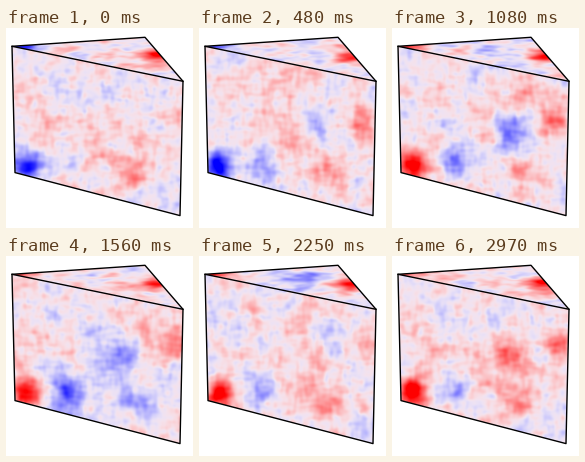
Animation, 187 px wide and 200 px high, one loop 3 s. Source, as a matplotlib script:

```python
import numpy as np
import matplotlib.pyplot as plt
from matplotlib.animation import FuncAnimation
from matplotlib.patches import Polygon

W, H, DPI = 187, 200, 100
FRAMES, INTERVAL = 100, 30
TAU = 2 * np.pi
SOFTNESS = 0.11  # how far red and blue mix around zero

# wedge corners in pixels
TIP, BACK, RIGHT = (6, 18.3), (139, 9.3), (177, 53.3)
LOW_RIGHT, LOW_LEFT = (174, 187.6), (9, 144.6)

X, Y = np.meshgrid(np.arange(W) + 0.5, np.arange(H) + 0.5)
ON_TOP = Y < TIP[1] + (X - TIP[0]) * (RIGHT[1] - TIP[1]) / (RIGHT[0] - TIP[0])

rng = np.random.default_rng(12)
FY, FX = np.meshgrid(np.fft.fftfreq(H), np.fft.fftfreq(W), indexing="ij")


def blob(x, y, rx, ry):
    return np.exp(-((X - x) / rx) ** 2 / 2 - ((Y - y) / ry) ** 2 / 2)


def smooth_noise(sx, sy):
    """White noise blurred to the given widths, with unit spread."""
    blur = np.exp(-TAU**2 / 2 * ((FX * sx) ** 2 + (FY * sy) ** 2))
    z = np.fft.ifft2(np.fft.fft2(rng.standard_normal((H, W))) * blur).real
    return z / z.std()


class Shimmer:
    """Noise that drifts through a few random patterns."""

    def __init__(self, strength, sx, sy, cycles):
        self.scale = strength / np.sqrt(len(cycles))
        self.waves = [(k, smooth_noise(sx, sy), smooth_noise(sx, sy))
                      for k in cycles]

    def at(self, t):
        return self.scale * sum(a * np.cos(TAU * k * t) + b * np.sin(TAU * k * t)
                                for k, a, b in self.waves)


SLOW, FAST = (1, 2, 3, 4), (3, 6, 9, 12)
front_noise = [Shimmer(0.06, 11, 11, SLOW), Shimmer(0.06, 5, 5, SLOW),
               Shimmer(0.045, 3.4, 1.6, FAST), Shimmer(0.045, 1.6, 3.4, FAST)]
top_noise = [Shimmer(0.10, 8, 2, SLOW), Shimmer(0.07, 3.5, 1, FAST)]


def flip(t):
    """Turns from -1 to 1 a quarter of the way through."""
    return np.tanh((t - 0.26) / 0.04)


def dip(t):
    return np.exp(-((t - 0.52) / 0.08) ** 2)


# each slow mode: its shape and its strength over the loop
front_modes = [
    (blob(21, 137, 9.5, 10), lambda t: 1.1 * flip(t)),
    (blob(63, 135, 10, 11), lambda t: -0.25 - 0.38 * np.sin(0.8 * np.pi * t)),
    (blob(117, 99, 10, 12), lambda t: -0.05 - 0.5 * np.sin(0.75 * TAU * t)),
    (blob(128, 145, 12, 11), lambda t: 0.42 - 0.87 * dip(t)),
    (blob(165, 90, 9, 11), lambda t: 0.1 + 0.4 * np.tanh(5 * t)),
    (blob(35, 80, 20, 24), lambda t: 0.12 * np.cos(2 * TAU * t)),
    (blob(92, 108, 17, 16), lambda t: 0.15 - 0.33 * dip(t)),
    (blob(132, 62, 22, 13), lambda t: 0.25 * np.sin(np.pi * t) - 0.08),
    (blob(90, 75, 70, 60), lambda t: 0.06),
]
top_modes = [
    (blob(152, 28, 12, 5), lambda t: 0.9),
    (blob(13, 18, 15, 4), lambda t: 0.75 * flip(t)),
    (blob(106, 21, 20, 5), lambda t: 0.22 * np.cos(2 * TAU * t) - 0.12),
    (blob(62, 21, 16, 4), lambda t: 0.08),
]


def surface(modes, noise, t):
    return (sum(shape * strength(t) for shape, strength in modes)
            + sum(layer.at(t) for layer in noise))


def colors(v):
    """Blue to red through a pale lilac."""
    spread = np.hypot(v, SOFTNESS)
    hot, cold = (spread + v) / 2, (spread - v) / 2
    return np.clip(np.dstack([1 - cold, 1 - hot - cold, 1 - hot]), 0, 1)


def picture(i):
    t = i / FRAMES
    return colors(np.where(ON_TOP, surface(top_modes, top_noise, t),
                           surface(front_modes, front_noise, t)))


fig = plt.figure(figsize=(W / DPI, H / DPI), dpi=DPI, facecolor="white")
ax = fig.add_axes([0, 0, 1, 1])
image = ax.imshow(picture(0), aspect="auto", extent=(0, W, H, 0),
                  interpolation="nearest")
ax.set_xlim(0, W)
ax.set_ylim(H, 0)
ax.axis("off")

outline = Polygon([TIP, BACK, RIGHT, LOW_RIGHT, LOW_LEFT], fill=False,
                  edgecolor="black", linewidth=1, joinstyle="round")
ax.add_patch(outline)
image.set_clip_path(outline)
ax.plot(*zip(TIP, RIGHT), color="black", linewidth=1)


def update(i):
    image.set_data(picture(i))
    return [image]


anim = FuncAnimation(fig, update, frames=FRAMES, interval=INTERVAL,
                     repeat=True, repeat_delay=0)
plt.show()
```
